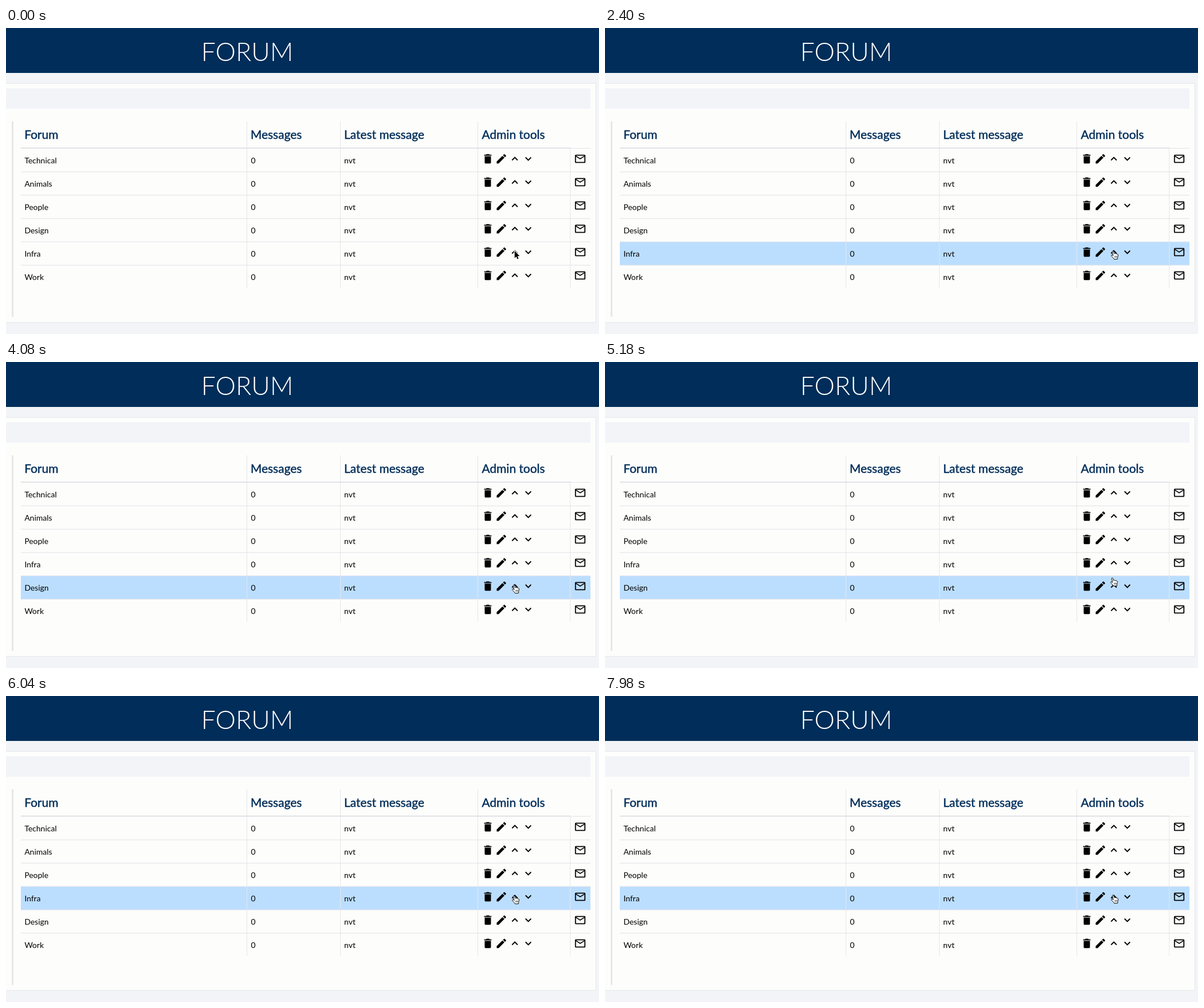
An HTML page with a canvas for the animation above (8 s loop, 1040 px wide and 538 px high).

```html
<!DOCTYPE html>
<html lang="en">
<head>
<meta charset="utf-8">
<title>Forum</title>
<style>
  html, body { margin: 0; width: 100%; height: 100%; overflow: hidden; background: #f2f4f7; }
  canvas { display: block; width: 1040px; height: 538px; }
</style>
</head>
<body>
<canvas id="stage" width="1040" height="538"></canvas>
<script>
const ctx = document.getElementById('stage').getContext('2d');
const LOOP = 8000;
const ROW_TOP = 212, ROW_H = 41, LEFT = 26, RIGHT = 1025;
const NAVY = '#002d59', LINE = '#e2e2e9';

const TIMES = { hand: 1660, hover: 1740, swap: 3700, leave: 5380 };

// Pointer position over time: ms, x, y
const TRACK = [
  [0, 887, 392.4], [1720, 887, 392.4], [1900, 886.6, 391.5],
  [4780, 886.6, 391.5], [5440, 885, 372.4], [5740, 886.6, 350.5],
  [7540, 886.6, 350.5], [7700, 886.8, 349.4], [LOOP, 886.8, 349.4]
];

const ICONS = {
  trash: new Path2D('M6 19c0 1.1.9 2 2 2h8c1.1 0 2-.9 2-2V7H6v12zM19 4h-3.5l-1-1h-5l-1 1H5v2h14V4z'),
  pencil: new Path2D('M3 17.25V21h3.75L17.81 9.94l-3.75-3.75L3 17.25zM20.71 7.04a1 1 0 0 0 0-1.41l-2.34-2.34a1 1 0 0 0-1.41 0l-1.83 1.83 3.75 3.75 1.83-1.83z'),
  up: new Path2D('M12 8l-6 6 1.41 1.41L12 10.83l4.59 4.58L18 14z'),
  down: new Path2D('M16.59 8.59L12 13.17 7.41 8.59 6 10l6 6 6-6z'),
  mail: new Path2D('M20 4H4c-1.1 0-2 .9-2 2v12c0 1.1.9 2 2 2h16c1.1 0 2-.9 2-2V6c0-1.1-.9-2-2-2zm0 14H4V8l8 5 8-5v10zm-8-7L4 6h16l-8 5z')
};
const TOOLS = [['trash', 845], ['pencil', 868.8], ['up', 892.4], ['down', 916], ['mail', 1007]];

const ARROW = new Path2D('M0 0V12.4L2.8 9.8 4.8 14.3 6.9 13.4 5 9H8.8Z');
const HAND = new Path2D('M3 2C2.6.4 4.8 0 5.3 1.5L6.4 5.3C7 4.4 8.4 4.6 8.7 5.5 9.5 4.8 10.7 5.1 10.9 6.1 11.9 5.6 13 6.1 13.1 7.2 13.4 9 13 10.5 12.3 12L12.2 14.8 6.3 15C5.6 13 3.5 11.6 1.9 9.9.4 8.3 1.8 7 3.2 7.8L4.6 8.8Z');
const CREASES = new Path2D('M7.4 9.4L7.7 12.4M9.2 9.2L9.4 12.2M11 9.1V12');

function box(x, y, w, h, color) {
  ctx.fillStyle = color;
  ctx.fillRect(x, y, w, h);
}

function text(str, x, y, font, color) {
  ctx.font = font + ' Lato, sans-serif';
  ctx.fillStyle = color;
  ctx.fillText(str, x, y);
}

function heading(str, x) {
  text(str, x, 195, '400 21px', NAVY);
  ctx.strokeStyle = NAVY;
  ctx.lineWidth = 0.45;
  ctx.strokeText(str, x, 195);
}

function icon(name, cx, cy) {
  const scale = 22 / 24;
  ctx.save();
  ctx.translate(cx - 11, cy - 11);
  ctx.scale(scale, scale);
  ctx.fillStyle = '#000';
  ctx.fill(ICONS[name]);
  ctx.restore();
}

function pointerAt(t) {
  const i = Math.max(1, TRACK.findIndex(p => p[0] > t));
  const [t0, x0, y0] = TRACK[i - 1], [t1, x1, y1] = TRACK[i];
  const k = (t - t0) / (t1 - t0), e = k * k * (3 - 2 * k);
  return [x0 + (x1 - x0) * e, y0 + (y1 - y0) * e];
}

function drawPage() {
  box(0, 0, 1040, 538, '#f2f4f7');
  box(0, 0, 1040, 79, NAVY);
  ctx.textAlign = 'center';
  text('FORUM', 423, 58, '300 45px', '#fff');
  ctx.textAlign = 'left';

  box(0, 97, 1035, 421, '#e5e7eb');
  box(0, 98, 1034, 419, '#fdfdfc');
  box(0, 106, RIGHT, 36, '#f2f4f8');
  box(10, 164, 3, 344, '#e7e7e9');
}

function drawTable(t) {
  if (t >= TIMES.hover) {
    const row = t < TIMES.leave ? 4 : 3;
    ctx.globalAlpha = Math.min(1, (t - TIMES.hover) / 100);
    box(LEFT, ROW_TOP + row * ROW_H, RIGHT - LEFT, ROW_H, '#bbdeff');
    ctx.globalAlpha = 1;
  }

  for (const x of [422, 586, 827]) box(x, 164, 1, 293, '#e6e6eb');
  box(989, ROW_TOP, 1, 245, '#e6e6eb');
  box(LEFT, 210.5, 964, 1.5, '#d9d9e1');
  box(990, 211, 35, 1, LINE);
  for (let i = 1; i < 6; i++) box(LEFT, ROW_TOP - 1 + i * ROW_H + 0.5, RIGHT - LEFT, 1, LINE);

  heading('Forum', 32.2);
  heading('Messages', 429);
  heading('Latest message', 593);
  heading('Admin tools', 834.6);

  const pair = t < TIMES.swap ? ['Design', 'Infra'] : ['Infra', 'Design'];
  ['Technical', 'Animals', 'People', ...pair, 'Work'].forEach((name, i) => {
    const y = 238 + i * ROW_H;
    text(name, 32.4, y, '400 14px', '#000');
    text('0', 429.5, y, '400 14px', '#000');
    text('nvt', 593, y, '400 14px', '#000');
    for (const [tool, x] of TOOLS) icon(tool, x, 230 + i * ROW_H);
  });
}

function drawPointer(t) {
  ctx.save();
  ctx.lineJoin = 'round';
  if (t < TIMES.hand) {
    ctx.translate(892, 392);
    ctx.strokeStyle = '#fff';
    ctx.lineWidth = 2;
    ctx.stroke(ARROW);
    ctx.fillStyle = '#000';
    ctx.fill(ARROW);
  } else {
    ctx.translate(...pointerAt(t));
    ctx.fillStyle = '#fff';
    ctx.fill(HAND);
    ctx.strokeStyle = '#000';
    ctx.lineWidth = 1;
    ctx.stroke(HAND);
    ctx.lineWidth = 0.7;
    ctx.stroke(CREASES);
  }
  ctx.restore();
}

function frame() {
  const t = performance.now() % LOOP;
  drawPage();
  drawTable(t);
  drawPointer(t);
  requestAnimationFrame(frame);
}
frame();
</script>
</body>
</html>
```
